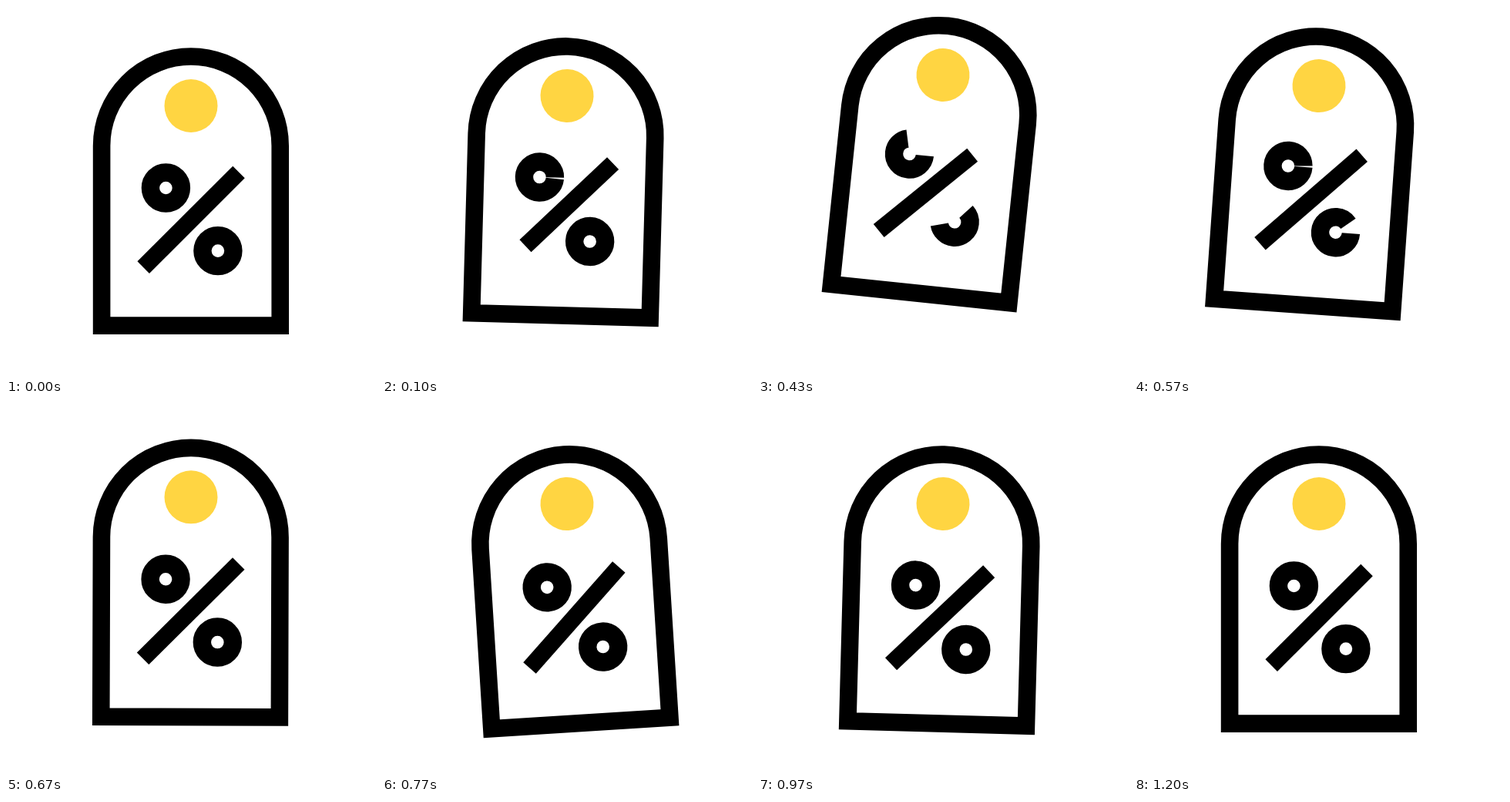
These frames come from a looping animation (480x480 px, 1370 ms). An HTML page:

```html
<!DOCTYPE html>
<html lang="en">
<head>
<meta charset="utf-8">
<title>Discount tag</title>
<style>
html, body { margin: 0; width: 100%; height: 100%; overflow: hidden; background: #fff; }
svg { display: block; width: 100vw; height: 100vh; }
</style>
</head>
<body>
<svg viewBox="0 0 480 480">
  <g id="tag" fill="none" stroke="#000" stroke-width="22.6">
    <path d="M124.1 414.6V181.3A115.8 115.8 0 0 1 355.7 181.3V414.6Z"/>
    <circle cx="240" cy="129.5" r="34.5" fill="#ffd542" stroke="none"/>
    <path class="part" pathLength="1" d="M178.2 339.1L302 215.5" stroke-width="22"/>
    <circle class="part" pathLength="1" cx="207.4" cy="236" r="20" stroke-width="23.4"/>
    <circle class="part" pathLength="1" cx="274.9" cy="317.6" r="20" stroke-width="23.4"/>
  </g>
</svg>
<script>
const LOOP = 1370, STEP = 1000 / 30;
const PIVOT = { x: 240, y: 129.5 };
const tag = document.getElementById('tag');
const parts = [...document.querySelectorAll('.part')];

const clamp = v => Math.min(1, Math.max(0, v));
const smooth = p => p * p * (3 - 2 * p);

// Keys: [frame, value, skew]; skew above 1 delays the ease towards that key.
function track(keys, f) {
  const i = keys.findIndex(k => k[0] > f);
  if (i < 0) return keys[keys.length - 1][1];
  const [f0, v0] = keys[i - 1], [f1, v1, skew = 1] = keys[i];
  return v0 + (v1 - v0) * smooth(((f - f0) / (f1 - f0)) ** skew);
}

const lift = [[0, 0], [8, -41.3], [13, -40], [23, 0]];
const swing = [[0, 0], [10, 6, 0.9], [12, 6], [24, -4, 1.45], [30, 2], [36, 0]];

// Accelerating wipe over ten frames
function wipe(f) {
  const p = clamp(f / 10);
  return Math.min(1, p * p * (1.25 - 0.2 * p));
}

// Hides the stretch between the redrawing edge and the erasing edge
function trim(el, f) {
  const head = wipe(f), tail = 1 - wipe(16 - f);
  const gap = head - tail;
  el.setAttribute('stroke-dasharray',
    gap < 0.001 ? 'none' : `${tail} ${gap} ${1 - head} 1`);
}

function frameAt(ms) {
  const n = Math.floor((ms + 5) / STEP);
  return Math.round(n * STEP / 10) * 10 > ms ? n - 1 : n;
}

function draw(ms) {
  const f = frameAt(ms);
  tag.setAttribute('transform',
    `translate(0 ${track(lift, f)}) rotate(${track(swing, f)} ${PIVOT.x} ${PIVOT.y})`);
  parts.forEach((el, i) => trim(el, f - 2 * i));
}

let start;
function tick(now) {
  start ??= now;
  draw((now - start) % LOOP);
  requestAnimationFrame(tick);
}
draw(0);
requestAnimationFrame(tick);
</script>
</body>
</html>
```
